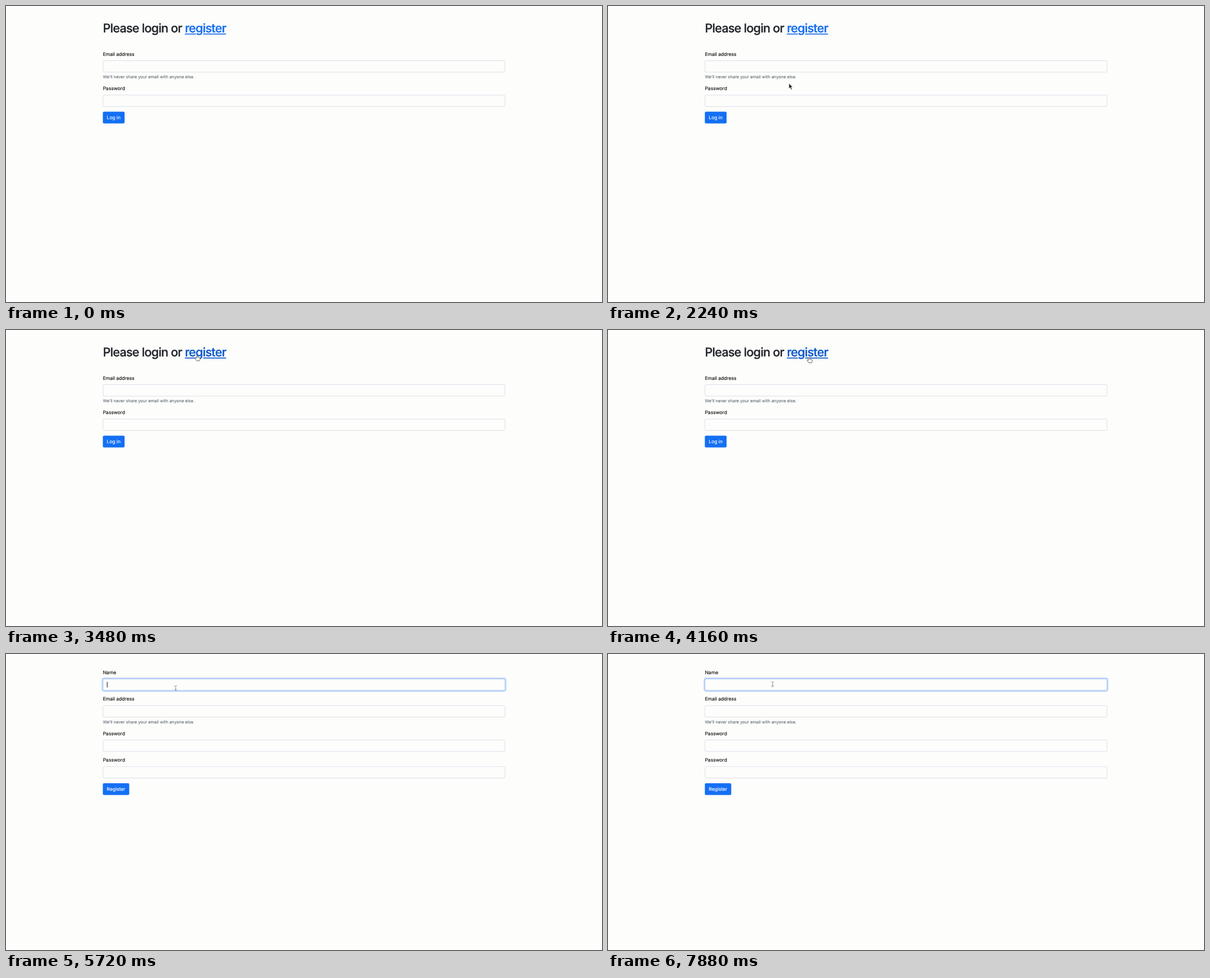
An HTML page for the animation above (8 s loop, 1061x528 px).

```html
<!DOCTYPE html>
<html lang="en">
<head>
<meta charset="utf-8">
<title>Login and register</title>
<style>
html, body { margin: 0; width: 100%; height: 100%; overflow: hidden; background: #fdfdfc; }
#screen {
  position: absolute; left: 0; top: 0; width: 1920px; height: 956px;
  transform: scale(calc(1061 / 1920)); transform-origin: 0 0;
  font: 15.6px/24px Inter, "Open Sans", sans-serif; letter-spacing: -.09px;
  font-optical-sizing: none; text-rendering: geometricPrecision; color: #212529;
  -webkit-text-stroke: .25px currentColor;
}
.page { position: absolute; left: 312px; top: 48px; width: 1296px; }
h1 {
  margin: 0 0 48px; font-size: 38.8px; line-height: 48px; font-weight: 500;
  letter-spacing: -1.2px; white-space: nowrap; -webkit-text-stroke-width: .6px;
}
.link { color: #126cee; text-decoration: underline; text-decoration-thickness: 3px; text-underline-offset: 4px; }
.link.hover { color: #0a58ca; }
.group { margin-bottom: 16px; }
.label { margin-bottom: 8px; color: #111; }
.field { position: relative; box-sizing: border-box; height: 38px; border: 1px solid #c4c7d3; border-radius: 4px; }
.hint { position: relative; top: 1.5px; margin-top: 4px; font-size: 13.6px; line-height: 21px; letter-spacing: -.03px; color: #6c757d; }
.button { display: inline-block; padding: 7px 12.5px; border-radius: 4px; background: #146ff4; color: #fff; }
#ring { position: absolute; inset: -1px; border: 1px solid #86b7fe; border-radius: 4px; box-shadow: 0 0 0 4px rgba(13, 110, 253, .25); }
#caret { position: absolute; left: 12px; top: 9px; width: 1.5px; height: 18px; background: #222; }
#pointer { position: absolute; left: 0; top: 0; overflow: visible; }
#pointer path { stroke-linejoin: round; stroke-linecap: round; }
</style>
</head>
<body>
<div id="screen">
  <div class="page" id="login"></div>
  <div class="page" id="register"></div>
  <svg id="pointer" width="1" height="1">
    <path id="arrow" d="M0 0V17L4 13L7 20L10 19L7 12H12Z" fill="#222" stroke="#fff"/>
    <path id="beam" d="M-4-8Q0-8 0-5V5Q0 8-4 8M4-8Q0-8 0-5M4 8Q0 8 0 5M-2 3H2" fill="none" stroke="#777" stroke-width="1.3"/>
    <path id="hand" d="M-4-7C-4-10 0-10 0-7V-2C1-4 4-3 4-1C5-3 8-2 8 0V4C8 6 6 7 6 9H-3C-4 6-9 2-8 0C-7-2-5 0-4 1Z" fill="#fff" stroke="#333" stroke-width="1.4"/>
  </svg>
</div>
<script>
const LOOP = 8000, STEP = 40, SCALE = 1061 / 1920;
const SHOW_POINTER = 1000, HOVER = 3360, SWITCH_PAGE = 4880, FOCUS = 5320;
const $ = id => document.getElementById(id);

const group = (label, hint = "", inner = "") =>
  `<div class="group"><div class="label">${label}</div><div class="field">${inner}</div>` +
  (hint && `<div class="hint">${hint}</div>`) + `</div>`;
const button = text => `<div class="button">${text}</div>`;
const email = group("Email address", "We'll never share your email with anyone else.");
const password = group("Password");

$("login").innerHTML =
  `<h1>Please login or <span class="link" id="link">register</span></h1>` +
  email + password + button("Log in");
$("register").innerHTML =
  group("Name", "", `<div id="ring"></div><div id="caret"></div>`) +
  email + password + password + button("Register");

// Pointer path: time, x, y, shape used from that time on
const path = [
  [1000, 388, 226, "arrow"], [1280, 381, 179, "beam"], [1400, 376, 159, "beam"],
  [1440, 371, 157, "arrow"], [1800, 328, 150, "arrow"], [2320, 321, 136, "arrow"],
  [2440, 321, 136, "arrow"], [2600, 317, 118, "beam"], [2760, 312, 96, "arrow"],
  [3000, 305, 53, "beam"], [3160, 304, 44, "beam"], [3280, 313, 44, "beam"],
  [3360, 326, 46, "hand"], [3480, 341, 50, "hand"], [3640, 341, 50, "hand"],
  [4160, 359, 53.5, "hand"], [5000, 359, 53.5, "beam"], [5200, 359, 53.5, "beam"],
  [5720, 302, 61, "beam"], [5800, 300, 61, "beam"], [5960, 300, 61, "beam"],
  [6480, 294, 55, "beam"], [7320, 294, 55, "beam"], [7880, 293, 54, "beam"], [8000, 293, 54, "beam"]
];

const clamp = v => Math.min(1, Math.max(0, v));
const show = (id, on) => { $(id).style.visibility = on ? "visible" : "hidden"; };

function drawPointer(t) {
  const visible = t >= SHOW_POINTER;
  const i = Math.max(0, path.findLastIndex(p => p[0] <= t));
  const [t0, x0, y0, shape] = path[i];
  const [t1, x1, y1] = path[i + 1];
  const k = clamp((t - t0) / (t1 - t0));
  const x = (x0 + (x1 - x0) * k) / SCALE, y = (y0 + (y1 - y0) * k) / SCALE;
  $("pointer").style.transform = `translate(${x}px, ${y}px)`;
  for (const id of ["arrow", "beam", "hand"]) show(id, visible && id === shape);
}

function draw(now) {
  const t = Math.floor(now % LOOP / STEP) * STEP;
  const registering = t >= SWITCH_PAGE;
  show("login", !registering);
  show("register", registering);
  $("link").classList.toggle("hover", t >= HOVER);
  const f = clamp((t - FOCUS) / 150);
  $("ring").style.opacity = registering ? f * f * (3 - 2 * f) : 0;
  show("caret", t >= FOCUS && (t - FOCUS) % 1000 < 500);
  drawPointer(t);
}

const start = performance.now();
function frame() {
  draw(performance.now() - start);
  requestAnimationFrame(frame);
}
frame();
</script>
</body>
</html>
```
